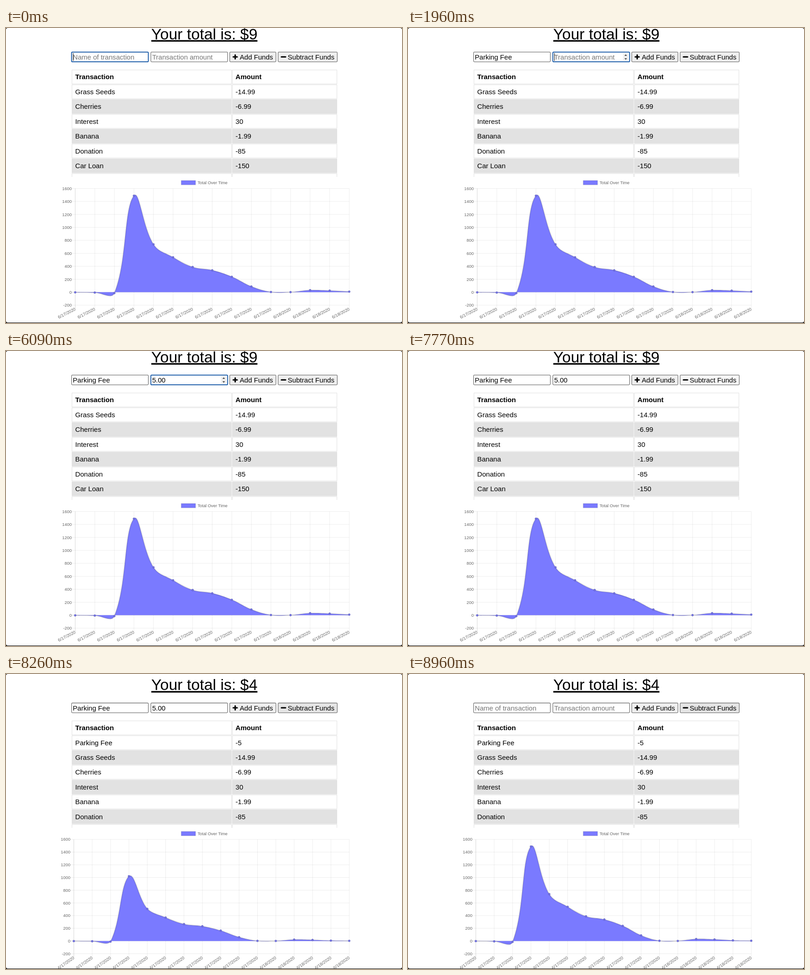
Animation of 867x646 px, one loop 9450 ms. Source, as an HTML page:

```html
<!DOCTYPE html>
<html lang="en">
<head>
<meta charset="utf-8">
<title>Budget tracker</title>
<style>
  html, body { margin: 0; width: 100%; height: 100%; overflow: hidden; background: #000; }
  svg { display: block; font-family: "Liberation Sans", Arial, Helvetica, sans-serif; font-size: 15.07px; }
  .title { font-size: 33.9px; text-decoration: underline; text-anchor: middle; }
  .small { font-size: 9.4px; fill: #666; }
  .end { text-anchor: end; }
  .bold { font-weight: bold; }
  .hint { fill: #757575; }
  .grid { stroke: #000; stroke-opacity: .09; stroke-width: .8; }
  .axis { stroke: #000; stroke-opacity: .2; stroke-width: .8; }
</style>
</head>
<body>
<svg id="stage" width="867" height="646" viewBox="0 0 867 646">
  <defs>
    <clipPath id="window"><rect width="867" height="645" rx="4"/></clipPath>
    <clipPath id="tableView"><rect x="140" y="88" width="590" height="238"/></clipPath>
  </defs>
  <rect width="867" height="645" rx="4" fill="#fff"/>
  <g clip-path="url(#window)">
    <g id="page">
      <g id="top"></g>
      <g id="table" clip-path="url(#tableView)"></g>
      <g id="axes"></g>
      <g id="series"></g>
    </g>
  </g>
</svg>
<script>
const LOOP = 9450, STEP = 70;
const SUBMIT = 8050, CLEAR = 8540;
const CHART_START = 8009, CHART_DURATION = 1000;
const FILL = '#7a7aff';

const byId = id => document.getElementById(id);
const pen = document.createElement('canvas').getContext('2d');
pen.font = '15.07px "Liberation Sans", Arial, Helvetica, sans-serif';

const text = (x, y, content, cls = '', extra = '') =>
  `<text x="${x}" y="${y}" class="${cls}" ${extra}>${content}</text>`;
const rect = (x, y, w, h, extra) =>
  `<rect x="${x}" y="${y}" width="${w}" height="${h}" ${extra}/>`;
const line = (x1, y1, x2, y2, cls) =>
  `<line x1="${x1}" y1="${y1}" x2="${x2}" y2="${y2}" class="${cls}"/>`;
const lerp = (a, b, p) => a + (b - a) * p;

// Last entry of [time, value] pairs whose time has been reached.
const at = (t, track) => track.filter(([start]) => start <= t).pop()[1];

const nameTrack = [[0, ''], [280, 'Parking Fee'], [CLEAR, '']];
const amountTrack = [[0, ''], [4200, '5'], [4830, '5.'], [5250, '5.0'], [5530, '5.00'], [CLEAR, '']];
const focusTrack = [[0, 'name'], [1960, 'amount'], [7700, '']];
const caretTrack = [[0, 1], [840, 0], [1400, 1], [2520, 0], [3080, 1], [3570, 0], [4130, 1],
  [4690, 0], [4830, 1], [6090, 0], [6650, 1], [7140, 0]];
const subtractTrack = [[0, '#efefef'], [6510, '#e5e5e5'], [7700, '#f6f6f6'], [SUBMIT, '#e5e5e5']];

const entries = [['Grass Seeds', '-14.99'], ['Cherries', '-6.99'], ['Interest', '30'],
  ['Banana', '-1.99'], ['Donation', '-85'], ['Car Loan', '-150'], ['', '']];
const totals = [-2, -6, -14, 1488, 738, 538, 388, 338, 238, 88, 3, 1, 31, 24, 9];

const layouts = {
  before: { left: 151.5, bottom: 607, angle: -27, values: totals },
  after: { left: 148.5, bottom: 601.7, angle: -35, values: [...totals, 4] }
};
const RIGHT = 751.5, TOP = 351.4;

function field(x, value, hint, focused, caretOn, hover) {
  const border = focused ? 'stroke="#2261ab" stroke-width="2"'
    : `stroke="${hover ? '#555' : '#767676'}" stroke-width="1.3"`;
  const textX = x + 2.7;
  let out = rect(x, 52.7, 168, 21.4, `rx="1.8" fill="#fff" ${border}`);
  out += text(textX, 69, value || hint, value ? '' : 'hint');
  if (hover) {
    out += rect(x + 153.5, 55, 12, 17, 'fill="#f0f0f0"');
    out += `<path d="M${x + 156.6} 61l2.9-3.2l2.9 3.2zM${x + 156.6} 66.2l2.9 3.2l2.9-3.2z" fill="#444"/>`;
  }
  if (focused && caretOn) {
    out += rect(textX + pen.measureText(value).width + .4, 55, 1, 17, 'fill="#000"');
  }
  return out;
}

function button(x, width, label, labelX, icon, fill) {
  return rect(x, 52.7, width, 21.4, `rx="1.8" fill="${fill}" stroke="#767676" stroke-width="1.3"`)
    + `<path d="${icon}" stroke="#000" stroke-width="3" stroke-linecap="round"/>`
    + text(labelX, 69, label);
}

function drawTop(t) {
  const focus = at(t, focusTrack), caret = at(t, caretTrack);
  const spinner = t >= 1610 && t < 7700;
  return text(434.3, 24.5, `Your total is: $${t < SUBMIT ? 9 : 4}`, 'title')
    + field(143.6, at(t, nameTrack), 'Name of transaction', focus === 'name', caret, false)
    + field(317.2, at(t, amountTrack), 'Transaction amount', focus === 'amount', caret, spinner)
    + button(489.8, 101.2, 'Add Funds', 511.8, 'M497.5 63.3h8.6M501.8 59v8.6', '#efefef')
    + button(595.8, 129.5, 'Subtract Funds', 616.8, 'M603 63.3h9', at(t, subtractTrack));
}

function drawTable(submitted) {
  const rows = [['Transaction', 'Amount'], ...(submitted ? [['Parking Fee', '-5']] : []), ...entries];
  return rows.map(([label, amount], i) => {
    const y = 91.9 + 32.42 * i;
    const cell = `fill="${i && i % 2 === 0 ? '#e2e2e2' : '#fff'}" stroke="#ddd" stroke-width=".9"`;
    const cls = i ? '' : 'bold';
    return rect(144.4, y, 349.4, 30.6, cell) + rect(495.6, y, 228.8, 30.6, cell)
      + text(151.6, y + 20.5, label, cls) + text(502.6, y + 20.5, amount, cls);
  }).join('');
}

const valueY = (layout, value) => lerp(layout.bottom, TOP, (value + 200) / 1800);
const pointX = (layout, i) => lerp(layout.left, RIGHT, i / (layout.values.length - 1));

function drawAxes(layout) {
  const { left, bottom, angle, values } = layout;
  let out = rect(383.6, 334, 31.4, 9.4, `fill="${FILL}" stroke="#000" stroke-opacity=".1" stroke-width="1.6"`)
    + text(419.4, 341.9, 'Total Over Time', 'small');
  for (let v = -200; v <= 1600; v += 200) {
    const y = valueY(layout, v);
    out += line(left - 7.8, y, RIGHT, y, v ? 'grid' : 'axis')
      + text(left - 7.6, y + 3.3, v, 'small end');
  }
  values.forEach((_, i) => {
    const x = pointX(layout, i), y = bottom + 7.9;
    out += line(x, TOP, x, y, i ? 'grid' : 'axis')
      + text(0, 3.3, `6/${i < 11 ? 17 : 18}/2020`, 'small end',
        `transform="translate(${x} ${y}) rotate(${angle})"`);
  });
  return out;
}

// Smooth curve nodes: each point with its incoming and outgoing control points.
function spline(points, tension = .4) {
  return points.map(([x, y], i) => {
    const a = points[Math.max(i - 1, 0)], b = points[Math.min(i + 1, points.length - 1)];
    const before = Math.hypot(x - a[0], y - a[1]), after = Math.hypot(b[0] - x, b[1] - y);
    const back = tension * before / (before + after), ahead = tension * after / (before + after);
    const dx = b[0] - a[0], dy = b[1] - a[1];
    return [x, y, x - back * dx, y - back * dy, x + ahead * dx, y + ahead * dy];
  });
}

function drawSeries(layout, progress) {
  const zero = valueY(layout, 0);
  const goal = spline(layout.values.map((v, i) => [pointX(layout, i), valueY(layout, v)]));
  const flat = spline(layout.values.map((_, i) => [pointX(layout, i), zero]));
  const nodes = goal.map((node, i) => node.map((n, k) => lerp(flat[i][k], n, progress)));
  let path = `M${nodes[0][0]} ${nodes[0][1]}`;
  for (let i = 1; i < nodes.length; i++) {
    const [x, y, inX, inY] = nodes[i], [, , , , outX, outY] = nodes[i - 1];
    path += `C${outX} ${outY} ${inX} ${inY} ${x} ${y}`;
  }
  return `<path d="${path}L${RIGHT} ${zero}H${layout.left}Z" fill="${FILL}"/>`
    + `<path d="${path}" fill="none" stroke="#000" stroke-opacity=".13" stroke-width="2.3"/>`
    + nodes.map(([x, y]) => `<circle cx="${x}" cy="${y}" r="2.4" fill="#7070e0" stroke="#000"
        stroke-opacity=".12" stroke-width=".8"/>`).join('');
}

function render(t) {
  const submitted = t >= SUBMIT;
  const layout = submitted ? layouts.after : layouts.before;
  const phase = Math.min((t - CHART_START) / CHART_DURATION, 1);
  const progress = submitted ? 1 - (1 - phase) ** 4 : 1;
  byId('page').setAttribute('transform', `translate(0 ${submitted ? 10.8 : 0})`);
  byId('top').innerHTML = drawTop(t);
  byId('table').innerHTML = drawTable(submitted);
  byId('axes').innerHTML = drawAxes(layout);
  byId('series').innerHTML = drawSeries(layout, progress);
}

const origin = performance.now();
let shown = -1;
function tick() {
  const t = Math.floor((performance.now() - origin) % LOOP / STEP) * STEP;
  if (t !== shown) render(shown = t);
  requestAnimationFrame(tick);
}
tick();
</script>
</body>
</html>
```
